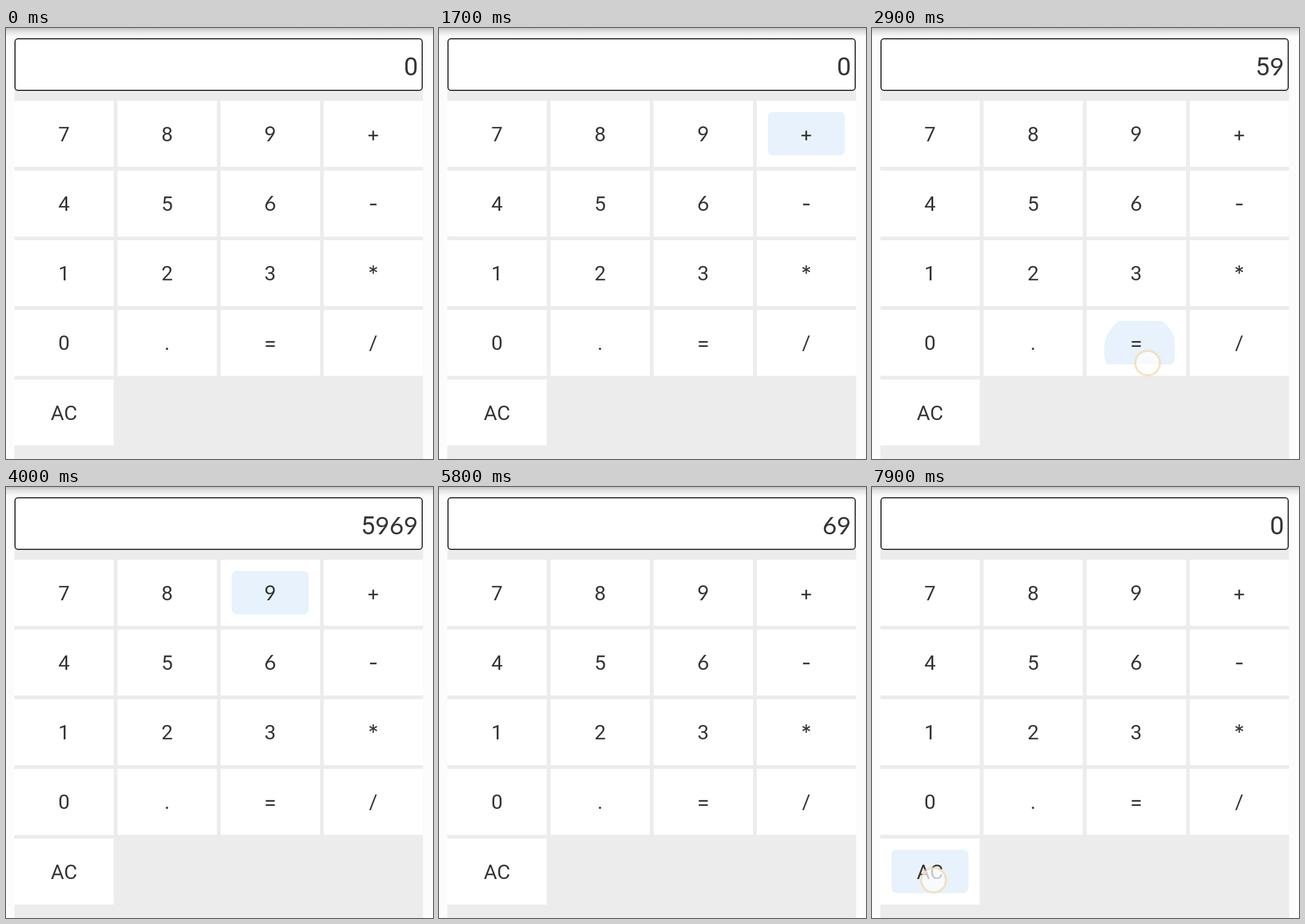
An HTML page that plays this animation: 711 by 719 pixels, repeating every 8 s.

```html
<!DOCTYPE html>
<html lang="en">
<head>
<meta charset="utf-8">
<title>Calculator</title>
<style>
  html, body { margin: 0; width: 100%; height: 100%; overflow: hidden; background: #fcfcfc; }
  svg { display: block; width: 711px; height: 719px; }
  text { font: 34px Roboto, sans-serif; fill: #363636; text-anchor: middle; }
  .op { font-family: Inter, sans-serif; }
  .bent { font-family: Lato, sans-serif; }
  #value { font-size: 42px; text-anchor: end; }
  #value .bent { font-size: 41px; }
  .ripple { fill: #e7f2fc; }
</style>
</head>
<body>
<svg viewBox="0 0 711 719">
  <defs>
    <linearGradient id="shade" x2="0" y2="1">
      <stop offset="0" stop-color="#c2c2c2"/>
      <stop offset=".35" stop-color="#e0e0e0"/>
      <stop offset="1" stop-color="#fcfcfc"/>
    </linearGradient>
  </defs>
  <rect width="711" height="719" fill="#fcfcfc"/>
  <rect width="711" height="15" fill="url(#shade)"/>
  <rect x="14" y="96" width="680.5" height="623" fill="#ececec"/>
  <rect x="15" y="18" width="678" height="86" rx="5" fill="#fff" stroke="#333" stroke-width="2"/>
  <text id="value" x="686" y="78.5"></text>
  <g id="keys"></g>
  <g id="ripples"></g>
  <g id="labels"></g>
  <g id="touch">
    <circle r="20.5" fill="none" stroke="#f3d3a0" stroke-opacity=".35" stroke-width="5"/>
    <circle r="20" fill="#fff" fill-opacity=".72" stroke="#f3d6a8" stroke-opacity=".8" stroke-width="2"/>
  </g>
</svg>
<script>
  const LOOP = 8000, STEP = 100;
  const GROW = 225, FADE = 150, LEAD = 25, TOUCH_END = 220;
  const START_R = 38.4, END_R = 73.5;

  // time, key, touch offset x and y from the key's centre, hold, display afterwards
  const presses = [
    [210, '3', 4, 3, 310, '3'],
    [910, '6', 6, 5, 310, '36'],
    [1410, '+', 5, 4, 310, '0'],
    [1910, '2', 8, 6, 310, '2'],
    [2410, '3', 6, 8, 210, '23'],
    [2808, '=', 19, 34, 210, '59'],
    [3410, '6', 8, 4, 210, '596'],
    [3710, '9', 6, 6, 310, '5969'],
    [4310, 'AC', 8, 28, 310, '0'],
    [4810, '6', 6, 4, 310, '6'],
    [5310, '9', 8, 6, 310, '69'],
    [6010, '*', 4, 5, 210, '0'],
    [6610, '3', 6, 4, 210 + 100, '3'],
    [6925, '6', 9, 0, 210, '36'],
    [7215, '=', 8, 6, 210, '2484'],
    [7730, 'AC', 6, 14.5, 210, '0']
  ].map(([at, key, dx, dy, hold, value]) => ({ at, key, dx, dy, hold, value }));

  const $ = id => document.getElementById(id);

  function add(parent, name, attrs, text) {
    const el = document.createElementNS('http://www.w3.org/2000/svg', name);
    for (const k in attrs) el.setAttribute(k, attrs[k]);
    if (text) el.textContent = text;
    parent.appendChild(el);
    return el;
  }

  const fontClass = ch => '69'.includes(ch) ? 'bent' : '+-*='.includes(ch) ? 'op' : '';

  const centres = {};
  [...'789+456-123*0.=/', 'AC'].forEach((key, i) => {
    const x = 14 + (i % 4) * 171.7, y = 121.5 + Math.floor(i / 4) * 116.25;
    centres[key] = { x: x + 82.5, y: y + 54.7, clip: 'clip' + i };
    add($('keys'), 'rect', { x, y, width: 165.4, height: 110, fill: '#fff' });
    const clip = add($('keys'), 'clipPath', { id: 'clip' + i });
    add(clip, 'rect', { x: x + 18.5, y: y + 18.5, width: 128, height: 72.4, rx: 8 });
    add($('labels'), 'text', { x: x + 82.5, y: y + 67, class: fontClass(key) }, key);
  });

  for (const p of presses) {
    p.centre = centres[p.key];
    const group = add($('ripples'), 'g', { 'clip-path': `url(#${p.centre.clip})` });
    p.ripple = add(group, 'circle', { class: 'ripple' });
  }

  const clamp = v => Math.min(1, Math.max(0, v));

  // cubic-bezier(.4, 0, .2, 1)
  function ease(x) {
    let lo = 0, hi = 1;
    for (let i = 0; i < 20; i++) {
      const s = (lo + hi) / 2, r = 1 - s;
      if (1.2 * s * r * r + 0.6 * s * s * r + s * s * s < x) lo = s; else hi = s;
    }
    return lo * lo * (3 - 2 * lo);
  }

  let shown = '';
  function showValue(value) {
    if (value === shown) return;
    shown = value;
    $('value').textContent = '';
    for (const ch of value) add($('value'), 'tspan', { class: fontClass(ch) }, ch);
  }

  function drawRipple(p, age) {
    const k = ease(clamp(age / GROW));
    const alpha = age < 0 ? 0 : clamp(age / 75) * (1 - clamp((age - p.hold) / FADE));
    p.ripple.setAttribute('cx', p.centre.x + p.dx * (1 - k));
    p.ripple.setAttribute('cy', p.centre.y + p.dy * (1 - k));
    p.ripple.setAttribute('r', START_R + (END_R - START_R) * k);
    p.ripple.setAttribute('opacity', alpha);
  }

  function draw(t) {
    let value = '0', finger = null;
    for (const p of presses) {
      const age = t - p.at;
      if (age >= 0) value = p.value;
      if (age >= -LEAD && age < TOUCH_END) finger = p;
      drawRipple(p, age);
    }
    showValue(value);
    $('touch').setAttribute('visibility', finger ? 'visible' : 'hidden');
    if (finger) {
      const { centre, dx, dy } = finger;
      $('touch').setAttribute('transform', `translate(${centre.x + dx} ${centre.y + dy})`);
    }
  }

  const begin = performance.now();
  function tick() {
    const t = (performance.now() - begin) % LOOP;
    draw(Math.floor(t / STEP) * STEP);
    requestAnimationFrame(tick);
  }
  tick();
</script>
</body>
</html>
```
